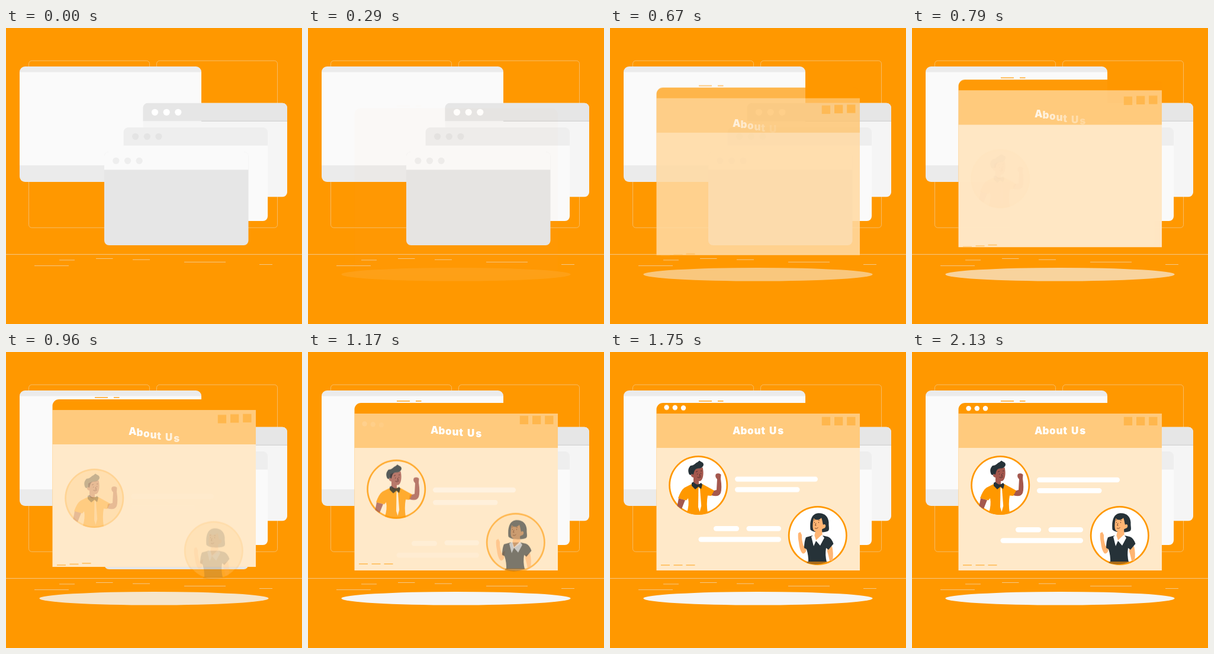
Animation, 500 px wide and 500 px high, one loop 2.18 s. Source, as an HTML page without scripts:

```html
<!DOCTYPE html>
<html lang="en">
<head>
<meta charset="utf-8">
<title>About Us</title>
<style>
html, body { margin: 0; width: 100%; height: 100%; overflow: hidden; background: #ff9800; }
svg { display: block; width: 100vw; height: 100vh; }
text { font: 900 17px Inter, "Open Sans", sans-serif; fill: #fff; }

.lift, .fade, .drift, .letter, .rise > * { animation: 2180ms linear infinite both; }
.lift, .fade { animation-timing-function: cubic-bezier(.47, 0, .48, 1.56); }
.lift { animation-name: lift; }
.fade { animation-name: fade; }
.drift { animation-name: drift; }
.letter { animation-name: letter; }
.rise > * { animation-timing-function: cubic-bezier(.36, -.01, .5, 1.38); }
.floor { animation: floor 2180ms linear infinite both; }
.man > * { animation-name: man; }
.woman > * { animation-name: woman; }
.lines > :nth-child(1) { animation-name: line1; }
.lines > :nth-child(2) { animation-name: line2; }
.lines > :nth-child(3) { animation-name: line3; }
.lines > :nth-child(4) { animation-name: line4; }
.lines > :nth-child(5) { animation-name: line5; }
.dots > :nth-child(1) { animation-name: dot1; }
.dots > :nth-child(2) { animation-name: dot2; }
.dots > :nth-child(3) { animation-name: dot3; }

@keyframes lift { 0%, 9.6% { translate: 0 50px } 53.7%, to { translate: 0 0 } }
@keyframes fade { 0%, 9.6% { opacity: 0 } 53.7%, to { opacity: 1 } }
@keyframes floor { 0%, 9.6% { opacity: 0 } 51%, to { opacity: 1 } }
@keyframes man { 0%, 33.5% { opacity: 0; translate: 0 30px } 72.5%, to { opacity: 1; translate: 0 0 } }
@keyframes woman { 0%, 35.8% { opacity: 0; translate: 0 30px } 77.1%, to { opacity: 1; translate: 0 0 } }
@keyframes line1 { 0%, 37.6% { opacity: 0; translate: 0 30px } 83.5%, to { opacity: 1; translate: 0 0 } }
@keyframes line2 { 0%, 39.7% { opacity: 0; translate: 0 30px } 85.6%, to { opacity: 1; translate: 0 0 } }
@keyframes line3 { 0%, 42.2% { opacity: 0; translate: 0 30px } 88.1%, to { opacity: 1; translate: 0 0 } }
@keyframes line4 { 0%, 41.3% { opacity: 0; translate: 0 30px } 87.2%, to { opacity: 1; translate: 0 0 } }
@keyframes line5 { 0%, 43.6% { opacity: 0; translate: 0 30px } 89.5%, to { opacity: 1; translate: 0 0 } }
@keyframes dot1 { 0%, 45% { opacity: 0; translate: 0 30px } 90.8%, to { opacity: 1; translate: 0 0 } }
@keyframes dot2 { 0%, 46.1% { opacity: 0; translate: 0 30px } 92%, to { opacity: 1; translate: 0 0 } }
@keyframes dot3 { 0%, 47.5% { opacity: 0; translate: 0 30px } 93.4%, to { opacity: 1; translate: 0 0 } }

/* --d is how far a part lags behind the window, in px */
@keyframes drift {
  0%, 14% { opacity: 0; translate: 0 calc(var(--d) * 1px + 4px) }
  30.7% { opacity: calc(1.2 - var(--d) * .15); translate: 0 calc(var(--d) * 1px + 4px) }
  44% { opacity: 1; translate: 0 calc(var(--d) * 1px) }
  53.7% { opacity: 1; translate: 0 -2px; animation-timing-function: ease-out }
  68.8%, to { opacity: 1; translate: 0 0 }
}
@keyframes letter {
  0%, 20.6% { opacity: 0; translate: 0 calc(var(--d) * 1px + 16px) }
  30.7% { opacity: calc(.7 - var(--d) * .06); translate: 0 calc(var(--d) * 1px + 13px) }
  44% { opacity: calc(1 - var(--d) * .025); translate: 0 calc(var(--d) * 1px + 7px) }
  53.7% { opacity: 1; translate: 0 calc(var(--d) * .5px - 1px); animation-timing-function: ease-out }
  68.8% { opacity: 1; translate: 0 calc(var(--d) * -.17px); animation-timing-function: ease-in-out }
  82%, to { opacity: 1; translate: 0 0 }
}
</style>
</head>
<body>
<svg viewBox="0 0 500 500">
  <defs>
    <g id="trio"><circle r="5.6"/><circle cx="19.7" r="5.6"/><circle cx="39.3" r="5.6"/></g>
    <path id="bar" d="M0 30.5V8a8 8 0 0 1 8-8H235.500a8 8 0 0 1 8 8V30.500Z"/>
  </defs>
  <rect width="500" height="500" fill="#ff9800"/>

  <!-- backdrop -->
  <g fill="none" stroke="#ebebeb" stroke-width=".8" opacity=".55">
    <rect x="38.500" y="55.300" width="204" height="282" rx="5"/>
    <rect x="254.500" y="55.300" width="204" height="282" rx="5"/>
  </g>
  <path d="M0 382.400H500" stroke="#ebebeb" stroke-width=".9" opacity=".65"/>
  <path d="M48 401.600h58M90 392h26M152 389.500h28.500M214 391.300h29M301 395.400h70M428 399.500h22" stroke="#ebebeb" stroke-width=".9" opacity=".65"/>

  <rect x="23" y="65" width="307" height="195" rx="9" fill="#ebebeb"/>
  <path d="M23 74.500H330V232H23Z" fill="#fafafa"/>

  <g transform="translate(231.500 126.800)">
    <rect width="243.500" height="158.500" rx="8" fill="#f5f5f5"/>
    <use href="#bar" fill="#e6e6e6"/>
    <path d="M98.500 30.500H243.500" stroke="#c4c4c4" stroke-width=".8"/>
    <use href="#trio" x="20" y="15.500" fill="#fff"/>
  </g>
  <g transform="translate(198.600 168)">
    <rect width="243.500" height="158" rx="8" fill="#fafafa"/>
    <use href="#bar" fill="#eee"/>
    <use href="#trio" x="20" y="15.300" fill="#e4e4e4"/>
  </g>
  <g transform="translate(166 209)">
    <rect width="243.500" height="158" rx="8" fill="#e6e6e6"/>
    <use href="#bar" fill="#fafafa"/>
    <use href="#trio" x="19.800" y="15.300" fill="#eee"/>
  </g>

  <ellipse class="floor" cx="250" cy="416.300" rx="193.700" ry="11.300" fill="#f5f5f5"/>

  <!-- page window -->
  <g class="lift">
    <path class="fade" d="M78.500 369V97a11 11 0 0 1 11-11H411a11 11 0 0 1 11 11V369Z" fill="#ff9800"/>
    <path class="fade" d="M78.500 104H422V162H78.500Z" fill="#fff" fill-opacity=".49"/>
    <path class="fade" d="M78.500 162H422V369H78.500Z" fill="#fff" fill-opacity=".79"/>
    <path class="fade" d="M150 82.900h22M182 82.900h9.500" stroke="#ffb03c" stroke-width="1.600"/>
    <g fill="#ffb74d">
      <rect class="drift" style="--d:2.5" x="357.800" y="109.700" width="14.300" height="14.300"/>
      <rect class="drift" style="--d:1.5" x="379" y="109.700" width="14.300" height="14.300"/>
      <rect class="drift" style="--d:1" x="400.200" y="109.700" width="14.300" height="14.300"/>
    </g>
    <g stroke="#ffb74d" stroke-width="1.500">
      <path class="drift" style="--d:6" d="M86 360h15"/>
      <path class="drift" style="--d:4.5" d="M107.500 360h15"/>
      <path class="drift" style="--d:3" d="M128.500 360h15"/>
    </g>
    <text class="letter" style="--d:0" x="207" y="139">A</text>
    <text class="letter" style="--d:2" x="220.500" y="139">b</text>
    <text class="letter" style="--d:4" x="232" y="139">o</text>
    <text class="letter" style="--d:6" x="243.500" y="139">u</text>
    <text class="letter" style="--d:8" x="255.300" y="139">t</text>
    <text class="letter" style="--d:10" x="269" y="139">U</text>
    <text class="letter" style="--d:12" x="283.300" y="139">s</text>
  </g>

  <g class="rise dots" fill="#fff">
    <circle cx="95.600" cy="95.200" r="4.200"/>
    <circle cx="109.800" cy="95.200" r="4.200"/>
    <circle cx="124" cy="95.200" r="4.200"/>
  </g>

  <g class="rise lines" fill="#fff">
    <rect x="211" y="211.700" width="140" height="8.500" rx="4.200"/>
    <rect x="211" y="230" width="109.500" height="8.500" rx="4.200"/>
    <rect x="175" y="296" width="43" height="8.500" rx="4.200"/>
    <rect x="230.500" y="296" width="58.500" height="8.500" rx="4.200"/>
    <rect x="149.500" y="314.300" width="139.500" height="8.500" rx="4.200"/>
  </g>

  <g class="rise man">
    <circle cx="149.200" cy="225" r="50" fill="#ff9800"/>
    <circle cx="149.200" cy="225" r="47.300" fill="#fff"/>
    <path d="M116 247L127 250 121 265A50 50 0 0 1 113.500 260Z" fill="#a4584e"/>
    <path d="M172 235L180 233 181 215Q176.500 211 179 206 184 203.500 187.500 207L187 214Q189.500 230 187 238 184 246 171 242Z" fill="#a4584e"/>
    <path d="M138 223L126 229Q120 233 115 247L129 250.500 132 247Q134 258 130 271A50 50 0 0 0 165 272.300Q162.500 256 165 242.500L171 243 176 234 156 223Z" fill="#ff9800"/>
    <path d="M139 200C145 196 152 196 156.500 195 158.500 203 158 213 154 217 152 218.500 150 218 150 218V223Q146 228 141 222V212C136 211 136 206 139 206Z" fill="#a4584e"/>
    <path d="M134 207C131 201 132 196 136 192 141 192 143 189 146 187 149 186 150 184 151 183.500 154 186 158 186 158 190.500 157 196 152 196.500 147 197 143 198 142 202 141 207L138 206 136.500 208Z" fill="#263238"/>
    <path d="M145 202.500l3-1M153 201l2.500-.3M147.500 205.500v1.500M153.500 204.500v1.500M151 206l1.500 3.500-2 .5M147.500 211.500q3 2 6-.5" fill="none" stroke="#53302f" stroke-width="1"/>
    <path d="M138 221L141 219.500Q147 227 154 221L156 224 154 231.500 149.500 227.500 144 232 138 226Z" fill="#263238"/>
    <path d="M149.500 228.500L152 231 154.200 260 151.500 270 149 262Z" fill="#fff"/>
  </g>

  <g class="rise woman">
    <circle cx="350.800" cy="310" r="50" fill="#ff9800"/>
    <circle cx="350.800" cy="310" r="47.300" fill="#fff"/>
    <path d="M319 322Q317 312 318 306L321.500 304 324 309Q323.500 318 327 328L333 324 331 337Q327 343 324 339 320 333 319 322Z" fill="#ffb573"/>
    <path d="M367 331L375 328Q378 340 376 352L371 353Q369 343 367 337Z" fill="#ffb573"/>
    <path d="M338.500 300C337 284 341 274 350 272.500 362 271 369 278 369.500 288 369 296 372 301 367 303 358 306 342 305 338.500 300Z" fill="#263238"/>
    <path d="M331 313L342 310H359L368 312Q374 314 377.500 324L369 334 365 331Q363 343 366 355H335Q335.500 344 332 333L328 331Q328 320 331 313Z" fill="#263238"/>
    <path d="M344 281C349 285 354 284 357 280 359 285 359 289 360 292 363 289 366 293 363 297 360 299 359 298 358 300L359 312 347 320 345 311 347 303C341 302 342 291 344 281Z" fill="#ffb573"/>
    <path d="M340 312L345 308.500 348 318 358 308.500 362 314 355 327 348 319 344 328Z" fill="#fff"/>
    <path d="M345.500 287v1.800M352.500 287v1.800M344 284l2.500-.6M351.500 284l2.500.5M348 289l-1.500 4h2M346 297.500q3 2 5.500-1" fill="none" stroke="#6b3f26" stroke-width=".9"/>
    <path d="M333 354H368A50 50 0 0 1 333 356.500Z" fill="#a86a18"/>
  </g>
</svg>
</body>
</html>
```
